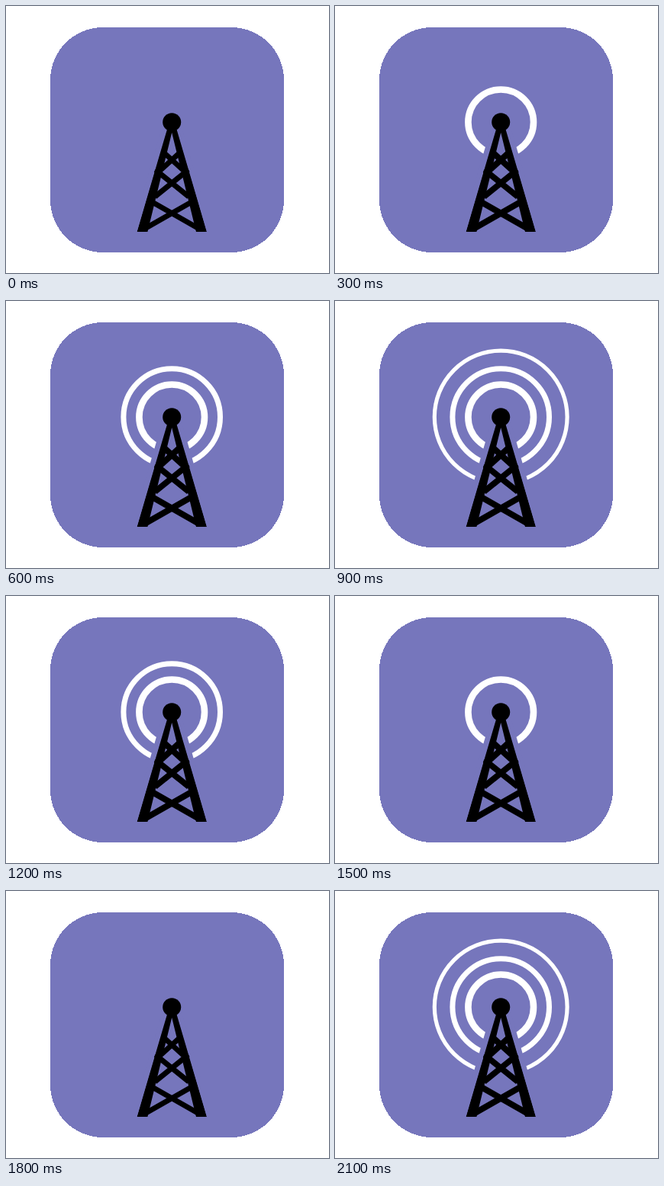
These frames come from a looping animation (423 px wide and 350 px high, 2.4 s). An HTML page:

```html
<!DOCTYPE html>
<html lang="en">
<head>
<meta charset="utf-8">
<title>Radio tower</title>
<style>
  html, body { margin: 0; width: 100%; height: 100%; overflow: hidden; background: #fff; }
  svg { display: block; width: 423px; height: 350px; }
  .rings circle { fill: none; stroke: #fff; visibility: hidden; }
  .braces { fill: none; stroke: #000; stroke-width: 7; }
  .lit .braces { stroke-width: 8; }
</style>
</head>
<body>
<svg id="stage" viewBox="0 0 423 350">
  <rect x="58" y="28" width="306" height="295" rx="69" fill="#7676bc" shape-rendering="crispEdges"/>
  <g class="rings">
    <circle cx="217.2" cy="152.3" r="42.8" stroke-width="8.6"/>
    <circle cx="217.2" cy="152" r="63.3" stroke-width="7"/>
    <circle cx="217.2" cy="152" r="86.9" stroke-width="5.2"/>
  </g>
  <!-- gap that keeps the rings clear of the legs -->
  <path d="M207 150 H227.4 L255 245 H179.4 Z" fill="#7676bc"/>
  <clipPath id="ground"><path d="M212 155 H222.4 L263 296 H171.5 Z"/></clipPath>
  <g clip-path="url(#ground)">
    <path d="M211.5 160 H223 L263 296 H249 L217.2 166 L185.4 296 H171.5 Z"/>
    <path class="braces" d="M188 255 L252 291.5 M246.4 255 L182.4 291.5
      M195 250 L239 214.5 M239.4 250 L195.4 214.5
      M202 215.5 L229 191 M232.4 215.5 L205.4 191"/>
  </g>
  <circle cx="217.2" cy="152.2" r="12"/>
</svg>
<script>
  const STEP = 300;
  const RING_COUNTS = [0, 1, 2, 3, 2, 1, 0, 3];
  const stage = document.getElementById("stage");
  const rings = [...stage.querySelectorAll(".rings circle")];
  const start = performance.now();

  function draw() {
    const time = performance.now() - start;
    const count = RING_COUNTS[Math.floor(time / STEP) % RING_COUNTS.length];
    rings.forEach((ring, i) => {
      ring.style.visibility = i < count ? "visible" : "hidden";
    });
    stage.classList.toggle("lit", count > 0);
    requestAnimationFrame(draw);
  }
  draw();
</script>
</body>
</html>
```
